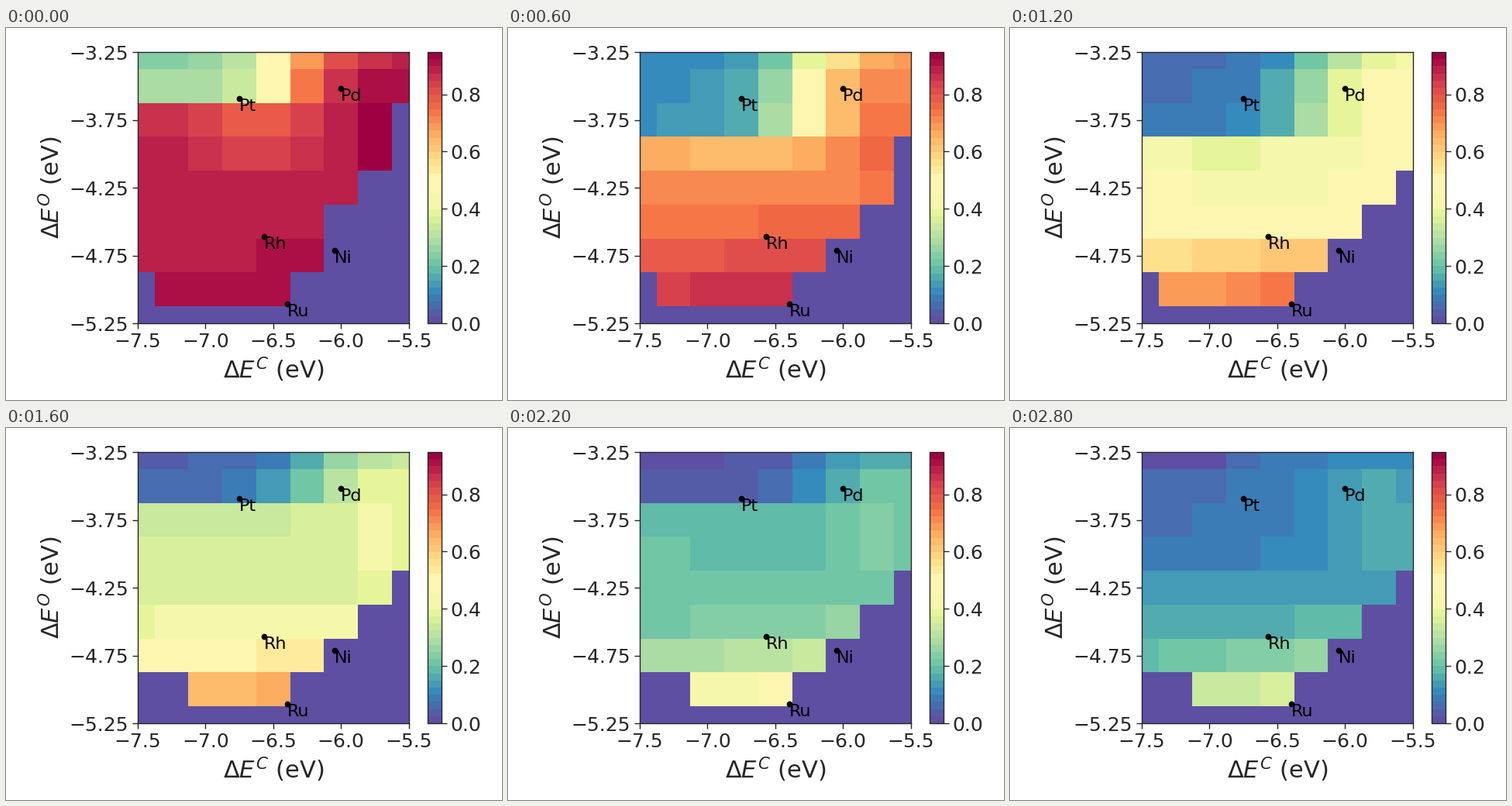
A matplotlib script for the animation above (3000 ms loop, 640 by 480 pixels).

```python
import matplotlib.pyplot as plt
import numpy as np
from matplotlib.animation import FuncAnimation
from matplotlib.colors import ListedColormap

W, H, DPI = 640, 480, 100
FRAMES, INTERVAL = 15, 200
VMAX, BANDS = 0.9478, 38
INK = "0.15"

plt.rcParams.update({
    "font.family": "DejaVu Sans", "font.size": 18,
    "text.color": INK, "axes.labelcolor": INK, "axes.edgecolor": INK,
    "xtick.color": INK, "ytick.color": INK,
    "axes.linewidth": 1, "axes.labelsize": 22,
    "xtick.major.size": 4.8, "ytick.major.size": 4.8,
    "xtick.major.width": 1, "ytick.major.width": 1,
})

R, C = np.mgrid[0:9, 0:9]
WAKE = {2: 1, 3: 5, 4: 3, 5: 1}   # step at which a row gains its last cell


def bump(r, c, dr, dc):
    return np.exp(-((R - r) / dr) ** 2 - ((C - c) / dc) ** 2)


def sigmoid(z):
    return 1 / (1 + np.exp(-z))


def active(n):
    """Cells inside the staircase border at step n."""
    late = np.array([n < WAKE.get(r, 0) for r in range(9)])
    end = np.minimum(9, 12 - R) - late[:, None]
    start = np.where(R == 7, 1 + (n >= 8), 0)
    idle_corner = (n >= 13) & (R == 0) & (C < 3)
    return (C >= start) & (C < end) & (R < 8) & ~idle_corner


def field(n):
    """Falling plateau, low upper left, high bottom rows and right flank."""
    level = np.interp(n, (0, 2, 4, 6, 9, 11, 14),
                      (2.6, 1.6, 0.58, -0.1, -0.63, -1.32, -1.75))

    # basin in the upper left: its strength and its depth in rows
    strength = np.interp(n, (0, 2, 6, 11, 14), (1.2, 1.1, 0.8, 0.75, 0.25))
    depth = np.interp(n, (0, 1, 7, 8, 11, 14), (1.6, 2.6, 2.6, 1.5, 1.5, 3.4))
    basin = 3 * sigmoid((4.7 - 0.25 * R - C) / 0.85) * sigmoid(6 * (depth - R))
    dip = 0.9 * np.exp(-n / 3) * bump(2.4, 3.7, 1.2, 2)

    k = np.maximum(R - 4, 0)
    floor = min(1, 0.4 + n / 2) * (0.1 * k * (k + 1) + 0.03 * k * (C - 3))
    flank = (0.3 + 1.3 * np.exp(-n)) * bump(2.2, 7.2, 1.5, 0.8)

    z = level - strength * basin - dip - 0.15 * (R == 0) + floor + flank
    return np.where(active(n), 0.95 * sigmoid(z), 0)


colors = plt.get_cmap("Spectral_r")(np.linspace(0, 1, BANDS))
colors[16:18, :3] = np.array((245, 248, 171)) / 255   # flat pale middle
colors[18:21, :3] = np.array((252, 246, 176)) / 255
cmap = ListedColormap(colors)

fig = plt.figure(figsize=(W / DPI, H / DPI), dpi=DPI, facecolor="white")


def axes_px(x, y, w, h):
    return fig.add_axes([x / W, 1 - (y + h) / H, w / W, h / H])


ax = axes_px(169.75, 31.05, 350, 350)
x_edges = -7.625 + 0.25 * np.arange(10)
y_edges = -3.125 - 0.25 * np.arange(10)
mesh = ax.pcolormesh(x_edges, y_edges, field(0), cmap=cmap, vmin=0, vmax=VMAX)
ax.set(xlim=(-7.5, -5.5), ylim=(-5.25, -3.25),
       xticks=np.arange(-7.5, -5.4, 0.5), yticks=np.arange(-5.25, -3.2, 0.5),
       xlabel=r"$\Delta E^C$ (eV)", ylabel=r"$\Delta E^O$ (eV)")

metals = {"Pt": (-6.75, -3.59), "Pd": (-6.0, -3.52), "Rh": (-6.568, -4.612),
          "Ni": (-6.048, -4.715), "Ru": (-6.397, -5.104)}
for name, (x, y) in metals.items():
    ax.plot(x, y, "o", color="black", ms=5.6, mew=0, zorder=3)
    ax.text(x, y, name, color="black", size=16, ha="left", va="top", zorder=4)

bar = fig.colorbar(mesh, cax=axes_px(544, 31.05, 18, 350))
bar.set_ticks(np.arange(0, 0.9, 0.2))


def update(n):
    mesh.set_array(field(n))
    return [mesh]


anim = FuncAnimation(fig, update, frames=FRAMES, interval=INTERVAL,
                     repeat=True, repeat_delay=0)
plt.show()
```
